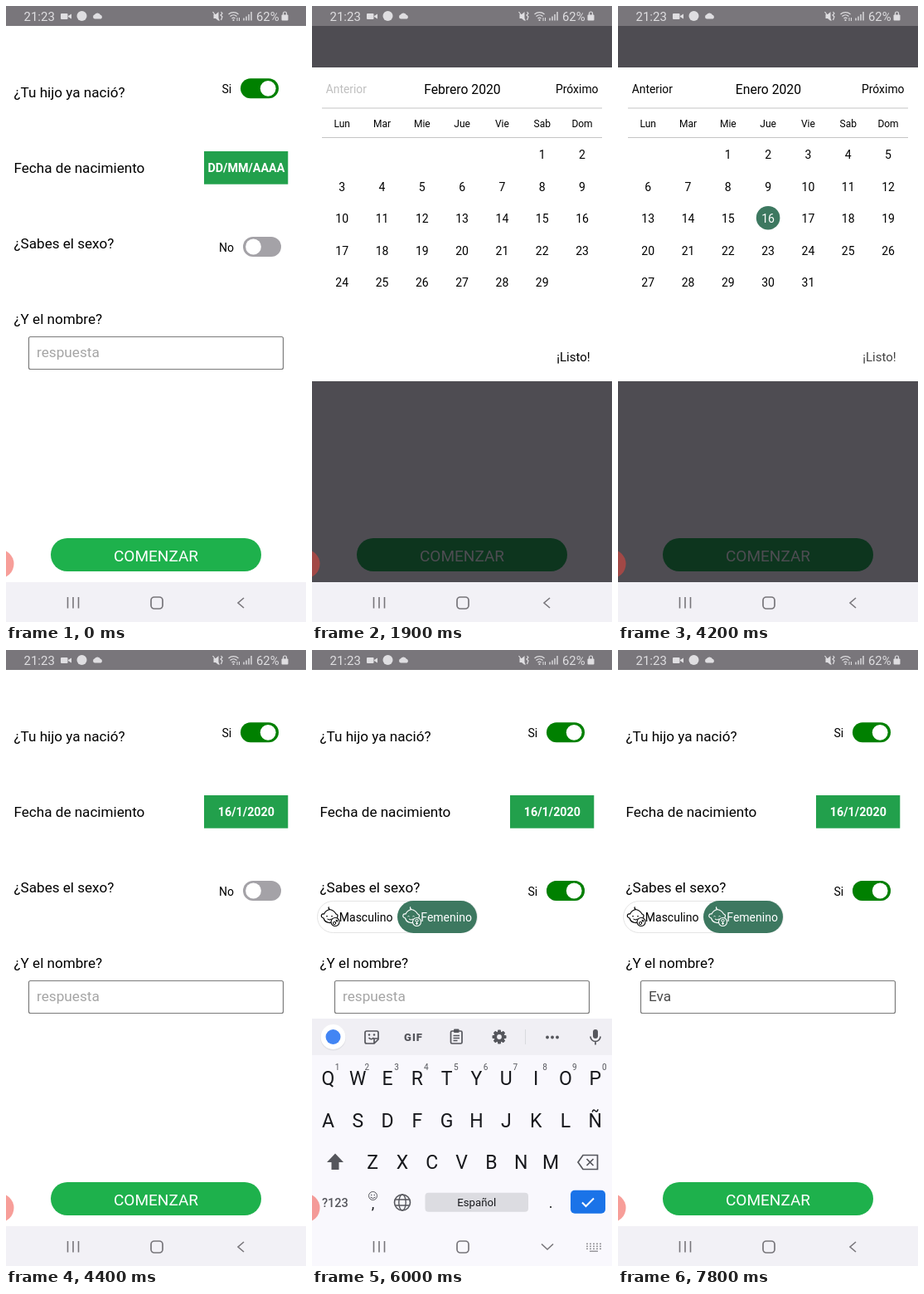
These frames come from a looping animation (362 px wide and 742 px high, 8 s). An HTML page:

```html
<!DOCTYPE html>
<html lang="es">
<head>
<meta charset="utf-8">
<title>Registro</title>
<style>
html, body { margin: 0; width: 100%; height: 100%; overflow: hidden; background: #fff; }
svg { display: block; width: 100vw; height: 100vh; font-family: Roboto, sans-serif; }
</style>
</head>
<body>
<svg id="stage" viewBox="0 0 362 742" xmlns="http://www.w3.org/2000/svg"></svg>
<script>
const LOOP = 8000;
const GREEN = '#008000', TEAL = '#3d7860', NAV = '#f2f1f6', PANEL = '#f9f8fd';
const GREY = '#77757a', KEY = '#17181c', ICON = '#55565c';

const text = (x, y, s, size, attrs = '') => `<text x="${x}" y="${y}" font-size="${size}" ${attrs}>${s}</text>`;
const mid = (x, y, s, size, attrs = '') => text(x, y, s, size, 'text-anchor="middle" ' + attrs);
const rect = (x, y, w, h, fill, r = 0, attrs = '') =>
  `<rect x="${x}" y="${y}" width="${w}" height="${h}" rx="${r}" fill="${fill}" ${attrs}/>`;
const dot = (x, y, r, fill, attrs = '') => `<circle cx="${x}" cy="${y}" r="${r}" fill="${fill}" ${attrs}/>`;
const line = (d, color, w = 1.5, attrs = '') =>
  `<path d="${d}" fill="none" stroke="${color}" stroke-width="${w}" ${attrs}/>`;
const fill = (d, color) => `<path d="${d}" fill="${color}"/>`;
const group = (id, body, attrs = '') => `<g id="${id}" ${attrs}>${body}</g>`;

function statusBar() {
  const c = '#dfdee1';
  return rect(0, 0, 362, 24, '#79767b')
    + text(21.5, 17.5, '21:23', 15, `fill="${c}"`)
    + rect(66, 9, 8.5, 7, c, 1) + fill('M75 12l4-2.5v6l-4-2.5z', c)
    + dot(91.5, 12, 6, c)
    + fill('M107 15.5a2.700 2.700 0 0 1 0-5.200a4 4 0 0 1 7 .5a2.500 2.500 0 0 1 .5 4.700z', c)
    + fill('M250.500 10h2.500l3.500-3v11l-3.500-3h-2.500z', c)
    + line('M249.500 7l8 10.500M259.500 7l1.500 2-2 2 2 2-1.500 4', c, 1.2)
    + line('M268.5 10a9 9 0 0 1 12 0M270.5 12.5a6 6 0 0 1 8 0M272.5 15a3 3 0 0 1 4 0', c, 1.2)
    + dot(274.5, 17, 1.1, c) + line('M279 14v4M281.5 14v4', c, 1)
    + line('M287 17.5v-3M290 17.5v-5M293 17.5v-7.500M296 17.5v-10.500', c, 1.4)
    + text(302, 17.5, '62%', 14.8, `fill="${c}"`)
    + rect(332.5, 10.5, 8, 7, c, 1) + line('M334.5 11v-2a2 2 0 0 1 4 0v2', c, 1.2);
}

function navBar() {
  let keys = '';
  for (let i = 0; i < 15; i++) keys += rect(331 + i % 5 * 4, 714.5 + Math.floor(i / 5) * 3, 2, 1.6, '#9a999e');
  keys += rect(335, 723.5, 10, 1.5, '#9a999e');
  return rect(0, 694, 362, 48, NAV, 0, 'id="navBase"')
    + line('M74.5 712v13.5M81 712v13.5M87.5 712v13.5', GREY, 1.6)
    + rect(175, 712, 14, 14, 'none', 4, `stroke="${GREY}" stroke-width="1.7"`)
    + group('navBack', line('M287 713l-7 6 7 6', GREY, 1.6))
    + group('navHide', line('M277 715.5l7 6.5 7-6.5', GREY, 1.6) + keys);
}

function babyIcon(x, color, back, sign) {
  const head = 'M4 9Q6 4.500 11 3.500Q16 4.500 18.500 9Q21.500 10 20 13Q17 20 10 19.500'
    + 'Q5 19 3.500 14Q0 13 1 10Q2 8.500 4 9zM11 3.500q-2.500-1.500-1-3';
  const symbol = sign === 'm'
    ? 'M15 20a1.600 1.600 0 1 0 3.200 0a1.600 1.600 0 1 0-3.200 0M18 18.800l2-2.300m-2 0h2v2'
    : 'M15.900 17a1.600 1.600 0 1 0 3.200 0a1.600 1.600 0 1 0-3.200 0M17.500 18.600v3.400m-1.500-1.500h3';
  return `<g transform="translate(${x} 309)">`
    + line(head, color, 1.2)
    + line('M6.500 12q1-1 2 0M12.500 12q1-1 2 0M8 15q2.500 2 5 0', color, 1)
    + dot(17.5, 18.5, 5, back, `stroke="${color}" stroke-width="1.1"`)
    + line(symbol, color, 1) + '</g>';
}

function genderPicker() {
  const option = (x, s, color, back, sign) =>
    babyIcon(x, color, back, sign) + text(x + 22.3, 327, s, 14, `fill="${color}"`);
  return rect(6.5, 302.5, 193, 38, '#fff', 19, 'stroke="#e4e4e4"')
    + option(10.5, 'Masculino', '#000', '#fff', 'm')
    + group('femOff', option(109, 'Femenino', '#000', '#fff', 'f'))
    + group('femOn', rect(103, 302, 96, 39, TEAL, 19.5) + option(109, 'Femenino', '#fff', TEAL, 'f'));
}

function form() {
  const label = (y, s) => text(9.5, y, s, 17.1);
  return label(110, '¿Tu hijo ya nació?') + label(201, 'Fecha de nacimiento')
    + label(291.6, '¿Sabes el sexo?') + label(383, '¿Y el nombre?')
    + text(260.5, 105, 'Si', 14) + rect(283, 87.3, 46, 24, GREEN, 12) + dot(316.2, 99.3, 9.4, '#fff')
    + group('dateButton', rect(239, 175, 101.3, 39.7, '#22a04c')
      + mid(289.9, 200, '', 14.3, 'id="dateText" font-weight="700" fill="#fff"'))
    + text(257, 295.5, 'No', 14, 'id="sexLabel"')
    + group('sexSwitch', rect(286, 278, 46, 24, '#a4a2a7', 12) + rect(286, 278, 46, 24, GREEN, 12, 'id="sexOn"'))
    + dot(298.5, 290, 9.4, '#fff', 'id="sexThumb"')
    + group('gender', genderPicker())
    + rect(27.5, 398.5, 307, 39, '#fff', 2, 'stroke="#7b7b7b" stroke-width="1.2"')
    + text(37, 423, '', 17.2, 'id="nameText"')
    + rect(54, 641, 254, 40, '#1eb14c', 20) + mid(181, 668.5, 'COMENZAR', 19, 'fill="#fff"');
}

const MONTHS = [
  { from: 0, name: 'Abril', offset: 2, days: 30, mark: 8, color: '#cac9d1' },
  { from: 1350, name: 'Marzo', offset: 6, days: 31 },
  { from: 1750, name: 'Febrero', offset: 5, days: 29 },
  { from: 2150, name: 'Enero', offset: 2, days: 31, mark: 16, color: TEAL, markFrom: 3100 }
];
const colX = i => 36.2 + i * 48.3;

function monthDays({ offset, days, mark, color }, marked) {
  let out = '';
  for (let d = 1; d <= days; d++) {
    const cell = d + offset - 1, x = colX(cell % 7), y = 179 + Math.floor(cell / 7) * 38.5;
    const on = marked && d === mark;
    if (on) out += dot(x, y - .8, 14.3, color);
    out += mid(x, y + 5, d, 14, on ? 'fill="#fff"' : '');
  }
  return out;
}

function calendar() {
  const week = ['Lun', 'Mar', 'Mie', 'Jue', 'Vie', 'Sab', 'Dom'];
  return rect(0, 24, 362, 670, '#07030c', 0, 'opacity=".71"')
    + rect(0, 74, 362, 378, '#fff')
    + text(16.8, 105, 'Anterior', 13.8, 'id="prev"') + text(294, 105, 'Próximo', 13.9)
    + mid(181.4, 105.5, '', 15.7, 'id="monthName"')
    + line('M12 123h338M12 158.5h338', '#c4c4c4', 1)
    + week.map((s, i) => mid(colX(i), 146, s, 12)).join('')
    + group('days', '') + text(295.3, 428, '¡Listo!', 15, 'id="done"');
}

const ROWS = ['QWERTYUIOP', 'ASDFGHJKLÑ', 'ZXCVBNM'];
const keyX = i => 19.5 + i * 35.8;
const keyLetters = lower => ROWS.map((row, r) => [...row].map((ch, i) =>
  mid(keyX(r === 2 ? i + 1.5 : i), 524 + r * 50.5, lower ? ch.toLowerCase() : ch, 23, `fill="${KEY}"`)
).join('')).join('');

function toolbar() {
  let gear = '';
  for (let a = 0; a < 360; a += 45) gear += rect(224, 457.5, 4, 5, ICON, 1, `transform="rotate(${a} 226 466)"`);
  return rect(0, 444, 362, 44, '#f0eff4')
    + dot(25.5, 467, 15.5, '#e2e2e7') + dot(25.5, 466, 15, '#fff') + dot(25.5, 466, 9, '#4285f4')
    + line('M66 459h12q2 0 2 2v8l-5 5h-9q-2 0-2-2v-11q0-2 2-2zM80 468h-5v6M68.5 467q3 3.5 6 0', ICON, 1.7)
    + dot(69, 463.5, 1.2, ICON) + dot(75, 463.5, 1.2, ICON)
    + mid(122.5, 470.5, 'GIF', 13, `font-weight="900" letter-spacing="1" fill="${ICON}"`)
    + rect(167.5, 459, 13.5, 15, 'none', 1.5, `stroke="${ICON}" stroke-width="1.7"`)
    + rect(171, 456.5, 6.5, 4.5, ICON, 1)
    + line('M170.5 464.5h7.5M170.5 467.5h7.5M170.5 470.5h5', ICON, 1.3)
    + gear + dot(226, 466, 4.7, 'none', `stroke="${ICON}" stroke-width="3.6"`)
    + line('M257.5 457v18', '#d9dade', 1)
    + [284, 290, 296].map(x => dot(x, 466.5, 1.9, ICON)).join('')
    + rect(339, 457, 6, 11, ICON, 3) + line('M336 465.5a6 6 0 0 0 12 0M342 471.5v4', ICON, 1.7);
}

function bottomRow() {
  return text(12, 670.5, '?123', 14.5, `font-weight="500" fill="${ICON}"`)
    + dot(73.5, 657.5, 5, 'none', `stroke="${ICON}"`) + dot(71.7, 656.5, .8, ICON) + dot(75.3, 656.5, .8, ICON)
    + line('M70.5 659q3 3 6 0', ICON, 1) + mid(73.5, 673, ',', 18, `fill="${KEY}"`)
    + dot(109, 665.5, 9.5, 'none', `stroke="${ICON}" stroke-width="1.6"`)
    + `<ellipse cx="109" cy="665.5" rx="4.2" ry="9.5" fill="none" stroke="${ICON}" stroke-width="1.4"/>`
    + line('M100.5 662h17M100.5 669h17', ICON, 1.4)
    + rect(136.5, 653.7, 124.5, 23, '#dcdce1', 4) + mid(198.7, 670, 'Español', 13.2, `fill="${KEY}"`)
    + mid(288, 672, '.', 18, `fill="${KEY}"`)
    + rect(312, 650.7, 42, 28, '#1a73e8', 5) + line('M326 665.5l4.5 4.5 9.5-9.5', '#fff', 2);
}

function keyboard() {
  const digits = [...'1234567890'].map((d, i) => mid(keyX(i) + 11, 505.5, d, 10, `fill="${ICON}"`)).join('');
  const shift = 'M28 606.5l10 10.5h-5.5v9h-9v-9H18z';
  return rect(0, 444, 362, 250, PANEL) + toolbar() + digits
    + group('upper', keyLetters(false) + fill(shift, ICON))
    + group('lower', keyLetters(true) + line(shift, ICON, 1.7))
    + line('M327 608.5h17.5v17H327l-6-8.5zM331.5 613l8 8m0-8l-8 8', ICON, 1.7)
    + bottomRow();
}

document.getElementById('stage').innerHTML =
  '<clipPath id="screen"><rect y="24" width="362" height="670"/></clipPath>'
  + rect(0, 0, 362, 742, '#fff') + form() + group('modal', calendar())
  + `<g clip-path="url(#screen)">${group('keyboard', keyboard())}</g>`
  + statusBar() + navBar() + dot(-8, 672, 17.5, '#f0463c', 'opacity=".52"');

const $ = id => document.getElementById(id);
const show = (id, on) => $(id).setAttribute('display', on ? 'inline' : 'none');
const fade = (id, v) => $(id).setAttribute('opacity', v);
const write = (id, s) => { if ($(id).textContent !== s) $(id).textContent = s; };

const ramp = (t, a, b) => {
  const k = Math.min(1, Math.max(0, (t - a) / (b - a)));
  return k * k * (3 - 2 * k);
};
// Opacity of a tapped control: quick dim, short hold, slower return.
const tap = (t, at, low = .25) => 1 - (1 - low) * (ramp(t, at, at + 70) - ramp(t, at + 130, at + 380));

const NAME = 'Eva', TYPED_AT = [6500, 6800, 7100];
let shownDays = '';

function renderCalendar(t) {
  const modal = ramp(t, 620, 850) - ramp(t, 4210, 4390);
  show('modal', modal > 0);
  fade('modal', modal);
  const month = MONTHS.filter(m => t >= m.from).pop();
  const marked = month.mark && t >= (month.markFrom || 0);
  write('monthName', month.name + ' 2020');
  const key = month.name + marked;
  if (key !== shownDays) {
    shownDays = key;
    $('days').innerHTML = monthDays(month, marked);
  }
  fade('prev', Math.min(tap(t, 1240), tap(t, 1560), tap(t, 1810)));
  fade('done', tap(t, 3920));
}

function renderForm(t) {
  fade('dateButton', tap(t, 500));
  write('dateText', t < 4200 ? 'DD/MM/AAAA' : '16/1/2020');

  const on = ramp(t, 4780, 4980);
  fade('sexOn', on);
  $('sexSwitch').setAttribute('transform', `translate(${-3 * on} 0)`);
  $('sexThumb').setAttribute('cx', 298.5 + 17.7 * on);
  write('sexLabel', on > .5 ? 'Si' : 'No');
  $('sexLabel').setAttribute('x', on > .5 ? 260.5 : 257);
  show('gender', t >= 5000);
  show('femOff', t < 5400);
  show('femOn', t >= 5400);
}

function renderTyping(t) {
  const up = ramp(t, 5680, 5920) - ramp(t, 7450, 7700);
  show('keyboard', up > 0);
  $('keyboard').setAttribute('transform', `translate(0 ${250 * (1 - up)})`);
  show('navHide', up > .5);
  show('navBack', up <= .5);
  $('navBase').setAttribute('fill', up > .5 ? PANEL : NAV);

  const typed = NAME.slice(0, TYPED_AT.filter(at => t >= at).length);
  write('nameText', typed || 'respuesta');
  $('nameText').setAttribute('fill', typed ? '#484848' : '#a5a5a5');
  show('upper', !typed);
  show('lower', typed);
}

const start = performance.now();
function tick() {
  const t = (performance.now() - start) % LOOP;
  renderCalendar(t);
  renderForm(t);
  renderTyping(t);
  requestAnimationFrame(tick);
}
tick();
</script>
</body>
</html>
```
